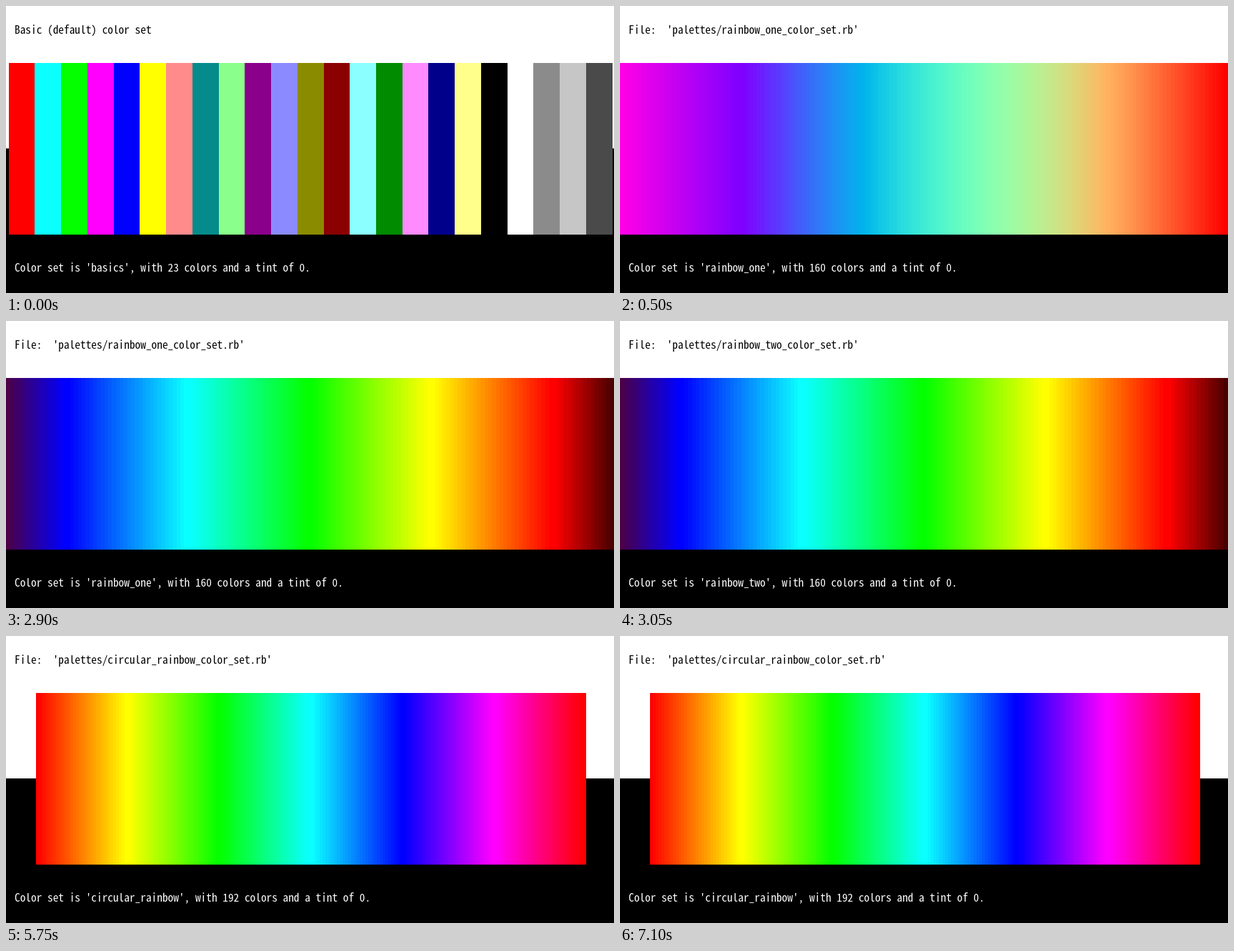
An HTML page that plays this animation: 851x403 px, repeating every 8000 ms.

```html
<!DOCTYPE html>
<html lang="en">
<head>
<meta charset="utf-8">
<title>Color sets</title>
<style>
html, body { margin: 0; width: 100%; height: 100%; overflow: hidden; background: #fff; }
svg { display: block; width: 851px; height: 403px; }
text {
  font-family: 'Noto Sans Mono CJK JP', 'Noto Sans Mono CJK SC', 'Noto Sans Mono', monospace;
  white-space: pre;
}
</style>
</head>
<body>
<svg viewBox="0 0 851 403">
  <rect width="851" height="403" fill="#fff"/>
  <rect y="200" width="851" height="203"/>
  <g id="sets" shape-rendering="crispEdges"></g>
  <text id="head" x="12" y="39"></text>
  <text id="foot" x="12" y="373" fill="#fff"></text>
</svg>
<script>
const NS = 'http://www.w3.org/2000/svg';
const TOP = 80, BOTTOM = 321, PITCH = 23 / 3, LOOP = 8000;
const $ = id => document.getElementById(id);
const rgb = c => `rgb(${c.map(Math.round).join()})`;

// Blend of n colors from a to b, both ends included
const ramp = (a, b, n) => Array.from({ length: n }, (_, i) =>
  a.map((v, k) => v + (b[k] - v) * i / (n - 1)));

const chain = stops => stops.slice(1).flatMap(([c, n], i) => ramp(stops[i][0], c, n));

const RED = [255, 0, 0], YELLOW = [255, 255, 0], GREEN = [4, 255, 0],
  CYAN = [10, 255, 255], BLUE = [0, 0, 255], MAGENTA = [255, 0, 255],
  VIOLET = [128, 0, 255];

const basics = ('f00 0cffff 04ff00 f0f 00f ff0 ff8b8b 058b8b 8bff8b 8b008b 8b8bff 8b8b00 ' +
  '8b0000 8bffff 008b00 ff8bff 00008b ffff8b 000 fff 8b8b8b c6c6c6 4a4a4a')
  .split(' ').map(h => '#' + h);

const sineBow = Array.from({ length: 128 }, (_, i) => {
  const x = i / 127;
  return [Math.min(1, Math.abs(2 * x - 0.5)), Math.sin(Math.PI * x), Math.cos(Math.PI * x / 2)]
    .map(v => v * 255);
});

const soft = [...ramp([255, 0, 230], VIOLET, 32), ...sineBow].map(rgb);
const vivid = chain([[[75, 0, 72]], [BLUE, 16], [CYAN, 32], [GREEN, 32],
  [YELLOW, 32], [RED, 32], [[75, 0, 0], 16]]).map(rgb);
const wheel = chain([[RED], [YELLOW, 32], [GREEN, 32], [CYAN, 32],
  [BLUE, 32], [MAGENTA, 32], [RED, 32]]).map(rgb);

function addSet(colors, left, step) {
  const g = document.createElementNS(NS, 'g');
  const edge = i => Math.floor(left + step * i + 0.001);
  colors.forEach((fill, i) => {
    const r = document.createElementNS(NS, 'rect');
    const box = { x: edge(i), y: TOP, width: edge(i + 1) - edge(i), height: BOTTOM - TOP, fill };
    for (const k in box) r.setAttribute(k, box[k]);
    g.append(r);
  });
  $('sets').append(g);
  return g;
}

const bars = {
  basics: addSet(basics, 4.15, 36.74),
  soft: addSet(soft, 0, 851 / 160),
  vivid: addSet(vivid, 0, 851 / 160),
  wheel: addSet(wheel, 42, 770 / 192)
};

const scenes = [
  { at: 0, set: 'basics', name: 'basics', count: 23, title: 'Basic (default) color set' },
  { at: 500, set: 'soft', name: 'rainbow_one', count: 160 },
  { at: 2900, set: 'vivid', name: 'rainbow_one', count: 160 },
  { at: 3050, set: 'vivid', name: 'rainbow_two', count: 160 },
  { at: 5750, set: 'wheel', name: 'circular_rainbow', count: 192 }
];

// Choose the font size that gives the wanted character pitch
function fitFont() {
  const probe = $('head');
  probe.setAttribute('font-size', 100);
  probe.textContent = '0'.repeat(20);
  const size = PITCH * 2000 / probe.getComputedTextLength();
  for (const id of ['head', 'foot']) $(id).setAttribute('font-size', size.toFixed(3));
}

let shown;
function draw(ms) {
  const t = ms % LOOP;
  const s = scenes.filter(v => v.at <= t).pop();
  if (s === shown) return;
  shown = s;
  for (const k in bars) bars[k].style.display = k === s.set ? '' : 'none';
  $('head').textContent = s.title || `File:  'palettes/${s.name}_color_set.rb'`;
  $('foot').textContent = `Color set is '${s.name}', with ${s.count} colors and a tint of 0.`;
}

fitFont();
draw(0);
const start = performance.now();
requestAnimationFrame(function tick(now) {
  draw(Math.max(0, now - start));
  requestAnimationFrame(tick);
});
</script>
</body>
</html>
```
